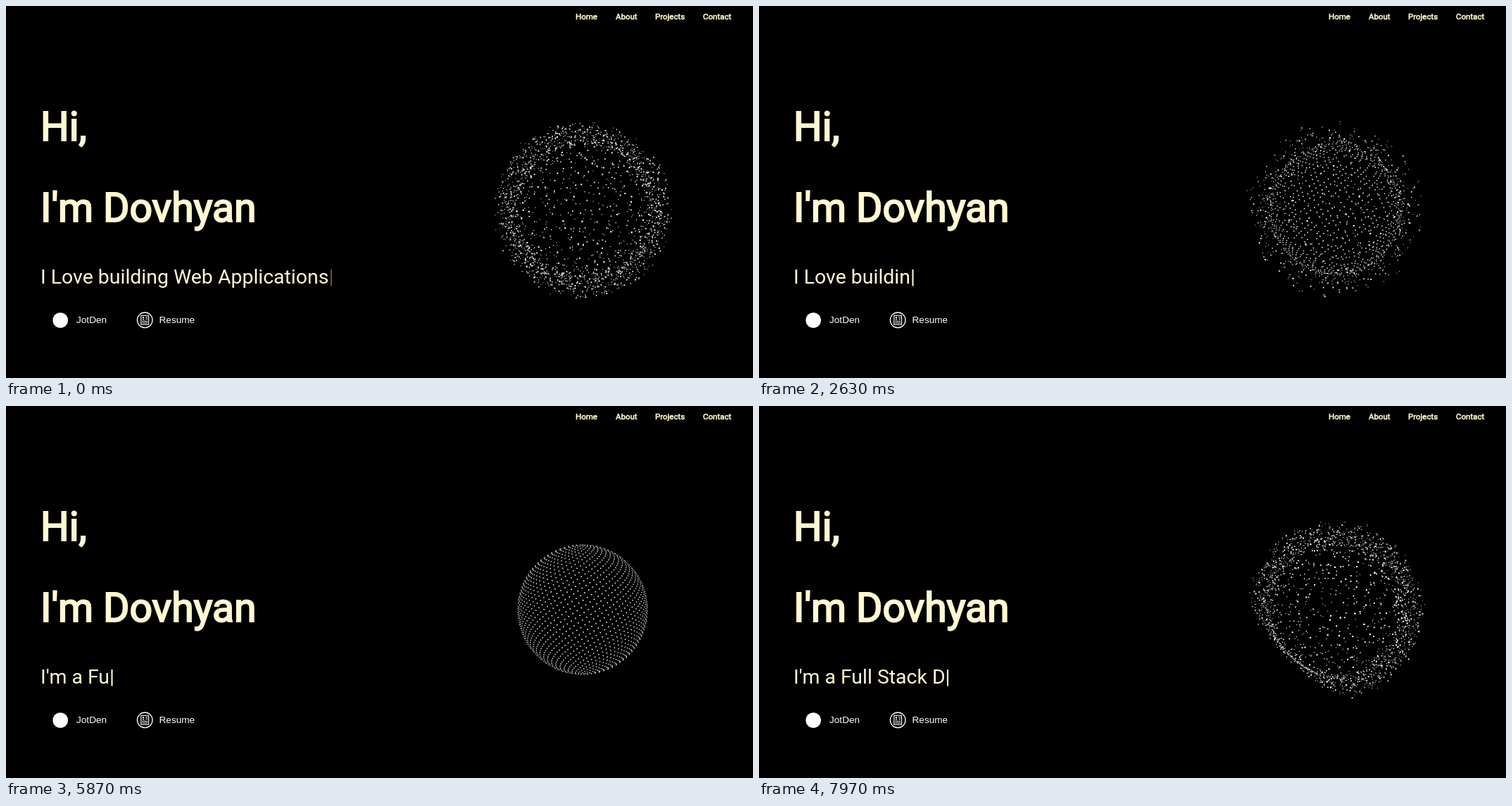
An HTML page with a canvas that plays this animation: 1061 by 528 pixels, repeating every 8 s.

```html
<!DOCTYPE html>
<html lang="en">
<head>
<meta charset="utf-8">
<title>Portfolio</title>
<style>
  html, body { margin: 0; width: 100%; height: 100%; overflow: hidden; background: #000; }
  canvas, svg { position: absolute; left: 0; top: 0; width: 1061px; height: 528px; display: block; }
  text { white-space: pre; }
  .cream { font-family: Roboto, sans-serif; font-weight: 400; fill: #fff9d2; }
  .bold { stroke: #fff9d2; stroke-linejoin: miter; }
  .nav { font-size: 11.5px; stroke-width: .6px; }
  .title { font-size: 57px; stroke-width: 2.1px; }
  .typed { font-size: 28.45px; }
  .label { font: 13.6px "Liberation Sans", Arial, sans-serif; fill: #fff; }
</style>
</head>
<body>
<canvas id="globe" width="1061" height="528"></canvas>
<svg viewBox="0 0 1061 528">
  <g class="cream bold nav">
    <text x="809" y="19">Home</text>
    <text x="866" y="19">About</text>
    <text x="922" y="19">Projects</text>
    <text x="990" y="19">Contact</text>
  </g>
  <g class="cream bold title">
    <text x="49" y="190.5">Hi,</text>
    <text x="49" y="305.5">I'm Dovhyan</text>
  </g>
  <text class="cream typed" x="49" y="394"><tspan id="words"></tspan><tspan id="cursor">|</tspan></text>
  <circle cx="77.2" cy="446" r="10.8" fill="#fff"/>
  <text class="label" x="100" y="450">JotDen</text>
  <g fill="none" stroke="#fff">
    <circle cx="197.2" cy="445.8" r="10.8" stroke-width="1.3"/>
    <rect x="191.8" y="439.3" width="10.8" height="12.8" stroke-width="1.1"/>
    <path d="M198.3 441.8h3M198.3 444.2h3M193.3 447.4h8M193.3 449.8h8" stroke-width="1"/>
    <path d="M193.2 445.6q1.8-3 3.6 0z" fill="#fff" stroke="none"/>
    <circle cx="195" cy="442.2" r="1.2" fill="#fff" stroke="none"/>
  </g>
  <text class="label" x="217.5" y="450">Resume</text>
</svg>
<script>
const LOOP = 8000, CX = 819, CY = 289, R = 92, COUNT = 3200;
// Camera distance in sphere radii, and the focal length that makes the outline R wide
const EYE = 3.87, FOCAL = R * Math.sqrt(EYE * EYE - 1);
const FIRST = "I Love building Web Applications";
const SECOND = "I'm a Full Stack Developer";
const words = document.getElementById("words");
const cursor = document.getElementById("cursor");
const ctx = document.getElementById("globe").getContext("2d");

const clamp = v => Math.min(1, Math.max(0, v));

let seed = 20117;
function random() {
  seed = (seed + 0x6D2B79F5) | 0;
  let v = Math.imul(seed ^ (seed >>> 15), 1 | seed);
  v = (v + Math.imul(v ^ (v >>> 7), 61 | v)) ^ v;
  return ((v ^ (v >>> 14)) >>> 0) / 4294967296;
}

// Points spread evenly on a sphere by the golden angle
const points = Array.from({ length: COUNT }, (_, i) => {
  const y = 1 - 2 * (i + 0.5) / COUNT;
  return {
    y,
    ring: Math.sqrt(1 - y * y),
    angle: i * Math.PI * (3 - Math.sqrt(5)),
    lift: 0.04 + 0.29 * random(),
    home: 1300 + 2400 * Math.pow(random(), 2.2),
    phase: random() * 2 * Math.PI,
    size: 0.9 + 1.1 * Math.pow(random(), 2)
  };
});

// 0 = resting on the sphere, 1 = fully scattered
function scatter(p, x, y, t) {
  if (t < 4900) return Math.pow(1 - clamp((t - p.home) / 1100), 3);
  const front = 30 - 0.094 * (t - 6720);
  return clamp(((x + y) * R / Math.SQRT2 - front) / 36);
}

function drawGlobe(t) {
  ctx.clearRect(0, 0, 1061, 528);
  ctx.fillStyle = "#fff";
  const spin = t * 0.0001;
  for (const p of points) {
    const a = p.angle + spin;
    const x = p.ring * Math.cos(a);
    const z = p.ring * Math.sin(a);
    const out = scatter(p, x, p.y, t);
    const r = 1 + out * p.lift;
    const scale = FOCAL / (EYE - z * r);
    const wobble = 0.03 * out;
    const dx = (x * r + wobble * Math.sin(t * 0.002 + p.phase)) * scale;
    const dy = (p.y * r + wobble * Math.cos(t * 0.0023 + p.phase * 3)) * scale;
    // The dark sphere hides what lies behind it
    if (z * r < 1 / EYE && Math.hypot(dx, dy) < R) continue;
    const front = Math.max(0, z);
    const rest = 1.05 + 0.55 * front;
    const size = (rest + (p.size - rest) * out) * (1 + 0.15 * z * out);
    ctx.globalAlpha = 0.8 + 0.2 * front;
    ctx.fillRect(CX + dx - size / 2, CY - dy - size / 2, size, size);
  }
}

function drawText(t) {
  let text;
  if (t < 4350) {
    const erased = Math.max(0, Math.floor((t - 350) / 125));
    text = FIRST.slice(0, Math.max(0, FIRST.length - erased));
  } else {
    text = SECOND.slice(0, Math.max(0, Math.floor((t - 4290) / 195)));
  }
  words.textContent = text;
  cursor.setAttribute("fill-opacity", 0.35 + 0.65 * clamp(t / 350));
}

function render(t) {
  drawText(t);
  drawGlobe(t);
}

const start = performance.now();
function tick() {
  render((performance.now() - start) % LOOP);
  requestAnimationFrame(tick);
}
render(0);
requestAnimationFrame(tick);
</script>
</body>
</html>
```
